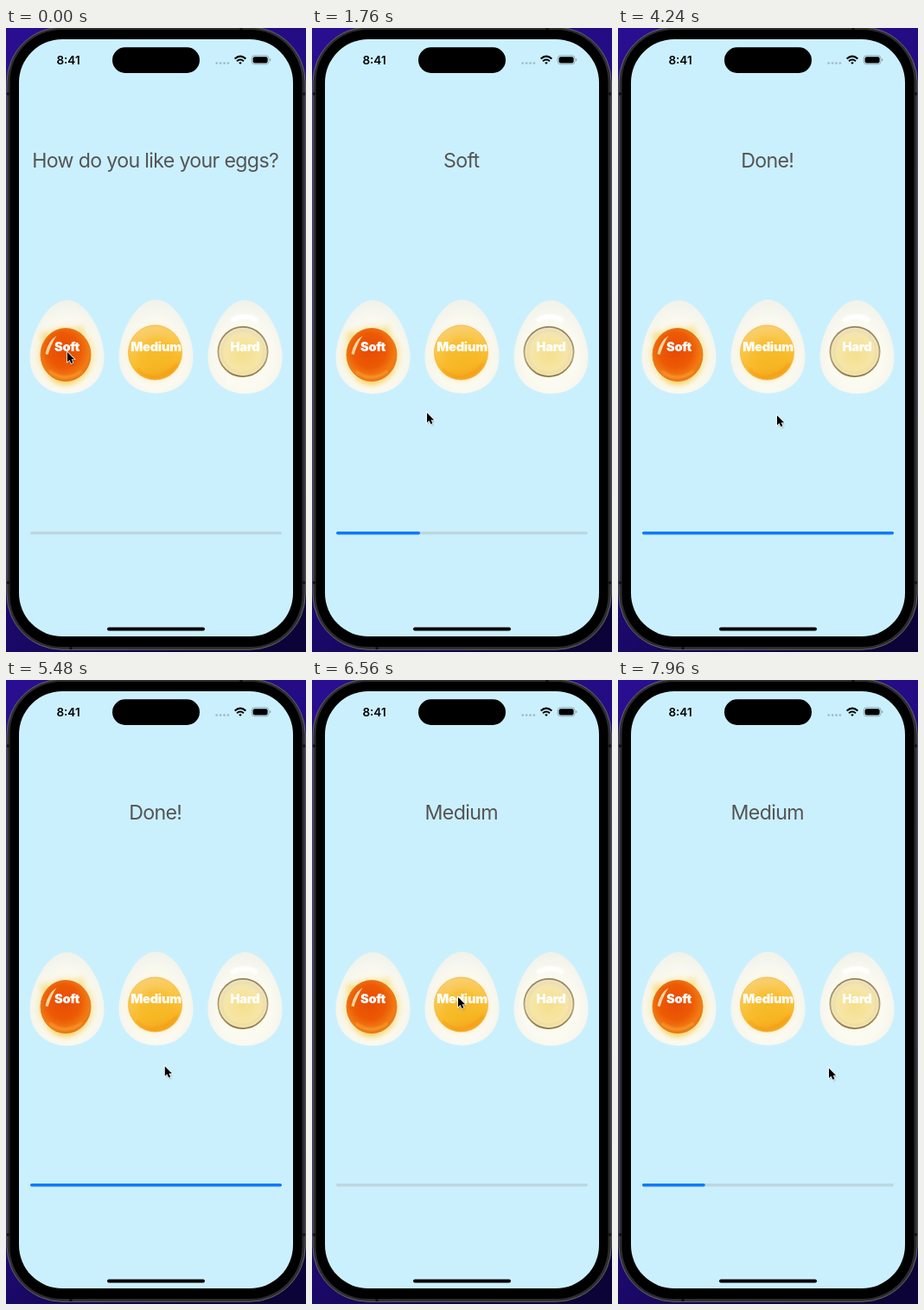
Recreate the animation shown at these times as an HTML page. Size 347 by 720 pixels, loop 8000 ms.

```html
<!DOCTYPE html>
<html lang="en">
<head>
<meta charset="utf-8">
<title>Egg timer</title>
<style>
  html, body { margin: 0; width: 100%; height: 100%; overflow: hidden; background: #1f0a86; }
  svg { display: block; width: 100vw; height: 100vh; }
  text { font-family: Inter, Roboto, sans-serif; text-anchor: middle; }
  #title { font-size: 23.2px; letter-spacing: -.68px; fill: #555; }
  .label { font-size: 14.7px; font-weight: 900; letter-spacing: -.3px; fill: #fff; }
  .clock { font-size: 13.5px; font-weight: 600; }
</style>
</head>
<body>
<svg viewBox="0 0 347 720">
  <defs>
    <linearGradient id="desk" x2=".6" y2="1">
      <stop stop-color="#2a0e91"/><stop offset=".6" stop-color="#220b80"/><stop offset="1" stop-color="#0c0438"/>
    </linearGradient>
    <radialGradient id="white" cy=".6" r=".6">
      <stop stop-color="#fffdf0"/><stop offset=".6" stop-color="#fbfaf1"/><stop offset="1" stop-color="#f0f2ea"/>
    </radialGradient>
    <radialGradient id="softYolk" cx=".46" cy=".42" r=".6">
      <stop stop-color="#e84a04"/><stop offset=".55" stop-color="#ec5a05"/>
      <stop offset=".85" stop-color="#f27c14"/><stop offset="1" stop-color="#e87512"/>
    </radialGradient>
    <linearGradient id="mediumYolk" x2=".25" y2="1">
      <stop stop-color="#f8d07c"/><stop offset=".4" stop-color="#fac94f"/>
      <stop offset=".8" stop-color="#f9ba2c"/><stop offset="1" stop-color="#f5a722"/>
    </linearGradient>
    <radialGradient id="hardYolk" cy=".55">
      <stop stop-color="#f5df8e"/><stop offset=".7" stop-color="#f6e6a6"/>
      <stop offset=".84" stop-color="#f3e5b2"/><stop offset="1" stop-color="#f0e5c0"/>
    </radialGradient>
    <linearGradient id="hardRing" x2="0" y2="1">
      <stop stop-color="#93835c"/><stop offset=".6" stop-color="#b5a374"/><stop offset="1" stop-color="#8d7945"/>
    </linearGradient>
    <filter id="blur" x="-50%" y="-50%" width="200%" height="200%"><feGaussianBlur stdDeviation="3.5"/></filter>
    <filter id="shade" x="-50%" y="-50%" width="200%" height="200%"><feGaussianBlur stdDeviation="1.2"/></filter>
    <path id="egg" fill="url(#white)" d="M0-54C23-54 43-15 43 12C43 38 24 54 0 54S-43 38-43 12C-43-15-23-54 0-54Z"/>
    <clipPath id="eggClip"><use href="#egg"/></clipPath>
  </defs>

  <!-- phone -->
  <rect width="347" height="720" fill="url(#desk)"/>
  <rect x="1" y="-1" width="345.2" height="718.3" rx="64" fill="#2d2d2e" stroke="#6c6c70" stroke-width=".9"/>
  <path d="M1 76h3M1 640h3M343 76h3M343 640h3M272 0v3M75 714v3" stroke="#111" stroke-width="3"/>
  <rect x="4.5" y="2" width="338" height="712" rx="60"/>
  <rect x="15" y="13" width="317" height="689" rx="50" fill="#cbf0fd"/>
  <rect x="123" y="22.3" width="101" height="29.6" rx="14.8"/>
  <rect x="117" y="691.4" width="113" height="4" rx="2"/>

  <!-- status bar -->
  <text class="clock" x="72" y="42">8:41</text>
  <path d="M243.7 40.6h14" stroke="#9fbdc8" stroke-width="2.9" stroke-linecap="round" stroke-dasharray="0 4.4"/>
  <g fill="none" stroke="#000" stroke-width="2">
    <path d="M264.6 35.6Q271 29.7 277.4 35.6M267 38.3Q271 34.8 275 38.3"/>
    <path d="M269.2 40L271 42L272.8 40Q271 38.7 269.2 40Z" fill="#000" stroke="none"/>
  </g>
  <rect x="284.2" y="31.8" width="19.8" height="10" rx="3.2" fill="none" stroke="#8aa4ad" stroke-width=".9"/>
  <rect x="285.6" y="33.2" width="17" height="7.2" rx="2"/>
  <path d="M305 35v3.6q1.4-.5 1.4-1.8T305 35Z" fill="#8aa4ad"/>

  <text id="title" x="172.7" y="161.3"></text>

  <g transform="translate(70.5 368)">
    <use href="#egg"/>
    <g clip-path="url(#eggClip)">
      <g filter="url(#blur)" fill="#f6d566">
        <circle cx="-1" cy="9" r="33" opacity=".5"/>
        <circle cx="15" cy="-19" r="6" opacity=".5"/>
        <circle cx="-25" cy="-12" r="6" opacity=".7"/>
        <path d="M-24 28Q-16 44 0 43T26 22L10 36Q-10 40-24 28Z" fill="#f7c62e"/>
      </g>
    </g>
    <ellipse cx="-1.5" cy="9" rx="29" ry="30.5" fill="url(#softYolk)" stroke="#dc7418" stroke-width=".8"/>
    <path d="M-20 28Q-2 42 17 28" fill="none" stroke="#f9a63c" stroke-width="3" opacity=".6" filter="url(#shade)"/>
    <path d="M-25 8Q-22-7-12-13Q-18-4-22 9Z" fill="#ffd6a0"/>
    <text class="label" y="5">Soft</text>
  </g>

  <g transform="translate(173.5 367.5)">
    <use href="#egg"/>
    <circle cx="-1" cy="8" r="32" fill="#fae9b0" opacity=".6" filter="url(#blur)"/>
    <ellipse cx="-1" cy="7" rx="31" ry="31.5" fill="url(#mediumYolk)" stroke="#f2b544" stroke-width=".8"/>
    <circle cx="0" cy="10" r="21" fill="#f5b51e" opacity=".5" filter="url(#blur)"/>
    <path d="M-22 26Q-2 47 25 20" fill="none" stroke="#f49a12" stroke-width="2.5" opacity=".6" filter="url(#shade)"/>
    <text class="label" y="5.5">Medium</text>
  </g>

  <g transform="translate(276.5 368)">
    <use href="#egg"/>
    <path d="M-16-30Q0-40 14-30" fill="none" stroke="#fff" stroke-width="6" filter="url(#shade)"/>
    <circle cx="-2.5" cy="5.5" r="28.6" fill="url(#hardYolk)" stroke="url(#hardRing)" stroke-width="1.8"/>
    <circle cx="-2.5" cy="5.5" r="24.5" fill="none" stroke="#e0cd8a" stroke-width="1.4" opacity=".5" filter="url(#shade)"/>
    <text class="label" y="5">Hard</text>
  </g>

  <rect x="28" y="581.1" width="291" height="3.3" rx="1.65" fill="#bcd7e1"/>
  <rect id="bar" x="28" y="581.1" height="3.3" rx="1.65" fill="#0a7aff"/>

  <g id="cursor">
    <path d="M1 2V15L4 12.3L6.2 17L8.6 16L6.5 11.3H10.5Z" opacity=".3" filter="url(#shade)"/>
    <path d="M0 0V13L2.9 10.3L5.1 15L7.5 14L5.4 9.4H9.4Z" stroke="#fff" stroke-width="1.6" paint-order="stroke"/>
  </g>
</svg>
<script>
  const LOOP = 8000, SECOND = 1000, BAR_WIDTH = 291;
  const [title, bar, cursor] = ["title", "bar", "cursor"].map(id => document.getElementById(id));

  const timers = [
    { name: "Soft", start: 80, seconds: 3 },
    { name: "Medium", start: 6120, seconds: 4 },
  ];

  // time, x, y of the pointer tip
  const pointer = [
    [0, 71, 374], [960, 71, 374], [1760, 133, 444], [2440, 184, 447],
    [5440, 184, 447], [6000, 169, 366], [6840, 169, 366], [7720, 244, 448], [LOOP, 244, 448],
  ];

  function pointerAt(t) {
    const next = pointer.findIndex(([time]) => time > t);
    const [t0, x0, y0] = pointer[next - 1], [t1, x1, y1] = pointer[next];
    const p = (t - t0) / (t1 - t0), eased = p * p * (3 - 2 * p);
    return [x0 + (x1 - x0) * eased, y0 + (y1 - y0) * eased];
  }

  function timerAt(t) {
    const timer = timers.findLast(({ start }) => t >= start);
    if (!timer) return ["How do you like your eggs?", 0];
    const ticks = Math.floor((t - timer.start) / SECOND);
    const done = ticks > timer.seconds;
    return [done ? "Done!" : timer.name, Math.min(ticks / timer.seconds, 1)];
  }

  function draw(now) {
    const t = now % LOOP;
    const [text, progress] = timerAt(t);
    if (title.textContent !== text) title.textContent = text;
    bar.setAttribute("width", BAR_WIDTH * progress);
    cursor.setAttribute("transform", `translate(${pointerAt(t)}) scale(.87)`);
  }

  const began = performance.now();
  function frame() {
    draw(performance.now() - began);
    requestAnimationFrame(frame);
  }
  frame();
</script>
</body>
</html>
```
